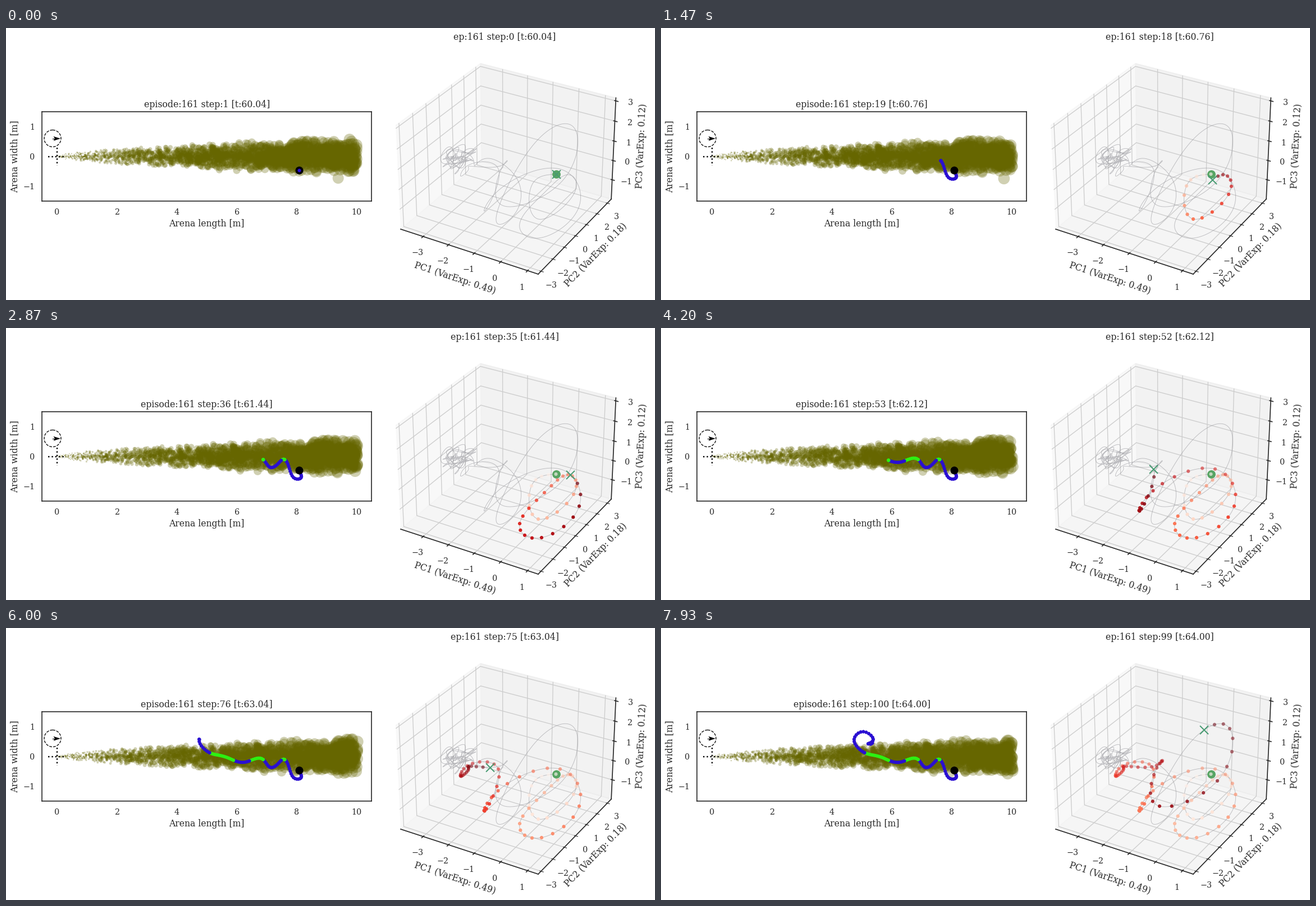
Recreate the animation shown at these times as a matplotlib script. Size 1156x484 px, loop 8000 ms.

```python
import numpy as np
import matplotlib.pyplot as plt
from matplotlib.animation import FuncAnimation
from matplotlib.patches import Circle, Polygon

W, H, DPI = 1156, 484, 100
STEPS, LOOP_MS = 100, 8000
PT = 72 / DPI
DARK = "0.15"

plt.rcParams.update({
    "font.family": "DejaVu Serif",
    "axes.titlesize": 15.75 * PT, "axes.labelsize": 15.65 * PT,
    "xtick.labelsize": 14.3 * PT, "ytick.labelsize": 14.3 * PT,
    "axes.edgecolor": DARK, "axes.labelcolor": DARK, "text.color": DARK,
    "xtick.color": DARK, "ytick.color": DARK,
    "axes.linewidth": 1.65 * PT, "xtick.major.width": 1.65 * PT,
    "grid.color": "0.8", "grid.linewidth": 1.3 * PT,
})

rng = np.random.default_rng(161)


def spline(knots, sub):
    """Natural cubic spline with `sub` samples per knot interval."""
    k = np.asarray(knots, float)
    n = len(k)
    system = 4 * np.eye(n) + np.eye(n, k=1) + np.eye(n, k=-1)
    system[0, :2], system[-1, -2:] = (1, 0), (0, 1)
    rhs = np.zeros_like(k)
    rhs[1:-1] = 6 * (k[:-2] - 2 * k[1:-1] + k[2:])
    bend = np.linalg.solve(system, rhs)
    u = np.arange((n - 1) * sub + 1) / sub
    i = np.minimum(u.astype(int), n - 2)
    t = (u - i)[:, None]
    s = 1 - t
    return s * k[i] + t * k[i + 1] + ((s**3 - s) * bend[i] + (t**3 - t) * bend[i + 1]) / 6


def box(left, top, width, height):
    return [left / W, (H - top - height) / H, width / W, height / H]


def dot_size(radius):
    return (2 * radius * PT) ** 2


# Flight track in the arena, one key point per five steps
track = spline([
    (521.5, 253), (525.5, 266.5), (512, 266), (503.5, 246), (494.5, 233.5),
    (483, 243), (469.5, 247.5), (458, 234), (443, 233), (427, 238.5),
    (411, 237.5), (396.5, 231.5), (382, 227), (368, 224), (354, 216),
    (344, 198), (360.5, 184.5), (378, 198), (369, 206), (376, 204.5), (371, 207)], 5)
in_odor = np.abs(track[:, 1] - 229) < 6.5
track_color = np.where(in_odor, "#2df012", "#2a0fd2")

# Projected state path, one key point per four steps, ending in a random tangle
state_keys = [
    (979.5, 260), (936, 281), (948, 340), (1011, 296), (1001, 261), (959, 293),
    (915, 348), (954, 373), (1021, 317), (987, 251), (893, 277), (853, 320),
    (861, 313), (877, 251), (831, 241), (810, 260), (814, 262), (824, 251),
    (829, 246), (874, 247), (893, 236), (878, 261), (888, 317), (991, 272),
    (1013, 179), (948, 198), (885, 300), (877, 349), (910, 325), (910, 268), (860, 232)]
tangle = np.clip(rng.normal((804, 229), (16, 13), (46, 2)), (778, 198), (835, 260))
state_line = spline(np.vstack([state_keys, tangle]), 16)
state = state_line[::4][:STEPS]
shade = np.interp(state[:, 1], [240, 335], [0.55, 1])

# Odor puffs drift downwind while spreading; a few strays lie further out
WIND = 0.5
puff_x = rng.uniform(-2, 10, 2300)
puff_n = rng.triangular(-1, 0, 1, puff_x.size)
puff_n[:30] *= 1.5

fig = plt.figure(figsize=(W / DPI, H / DPI), dpi=DPI, facecolor="white")

arena = fig.add_axes(box(64.3, 149.2, 587, 159))
arena.set(xlim=(-0.5, 10.5), ylim=(-1.5, 1.5), xticks=range(0, 11, 2), yticks=(-1, 0, 1))
arena.tick_params(length=0, pad=9.5)
arena.set_xlabel("Arena length [m]", labelpad=3)
arena.set_ylabel("Arena width [m]")
arena_title = arena.set_title("", y=1)

space = fig.add_axes(box(670, 29.3, 436.2, 436.2), projection="3d", facecolor="none")
space.view_init(elev=30, azim=-60)
space.set(xlim=(-3.905, 1.39), ylim=(-3.236, 3.394), zlim=(-2.02, 3.15),
          xticks=range(-3, 2), yticks=range(-3, 4), zticks=range(-1, 4))
space.set_xlabel("PC1 (VarExp: 0.49)", labelpad=4)
space.set_ylabel("PC2 (VarExp: 0.18)", labelpad=2)
space.set_zlabel("PC3 (VarExp: 0.12)", labelpad=1)
space_title = space.set_title("")
space_title.set_y(1)

# Pixel-space layer for everything that sits on the two plots
top = fig.add_axes([0, 0, 1, 1], facecolor="none", zorder=5)
top.set(xlim=(0, W), ylim=(H, 0))
top.axis("off")

puffs = top.scatter([], [], color="#666600", alpha=0.3, linewidths=0, zorder=1)
for x, y in [((75, 107), (229, 229)), ((91.3, 91.3), (213, 245))]:
    top.plot(x, y, ":", color="black", lw=2.4 * PT, zorder=2)
top.add_patch(Circle((83, 196.5), 15, fill=False, ls="--", lw=1.3 * PT, ec="black"))
top.plot([83, 89], [196.8, 196.8], color="black", lw=1.2 * PT)
top.add_patch(Polygon([(97, 196.8), (84.5, 192.8), (87, 196.8), (84.5, 200.8)], color="black", lw=0))

trail = top.scatter([], [], s=dot_size(3.1), linewidths=0, zorder=3)
top.scatter(*track[0], s=dot_size(7), color="black", linewidths=0, zorder=4)
head = top.scatter([], [], s=dot_size(3.1), linewidths=0, zorder=5)

top.plot(*state_line.T, color="#8c8c92", alpha=0.55, lw=0.9 * PT, zorder=2)
top.scatter(*state[0], s=dot_size(7.4), color="#57a463", linewidths=0, zorder=3)
dots = top.scatter([], [], s=dot_size(3.1), linewidths=0, zorder=4)
cross, = top.plot([], [], "x", color="#479b72", ms=15 * PT, mew=2 * PT, zorder=5)


def draw(step):
    seconds = 0.04 * step
    clock = f"[t:{60.04 + seconds:.2f}]"
    arena_title.set_text(f"episode:161 step:{step + 1} {clock}")
    space_title.set_text(f"ep:161 step:{step} {clock}")

    x = puff_x + WIND * seconds
    live = (x > 0.02) & (x < 10.03)
    x = x[live]
    y = 0.19 * np.sqrt(x) * puff_n[live]
    puffs.set_offsets(np.column_stack([91 + 53.36 * x, 228.7 - 53 * y]))
    puffs.set_sizes(dot_size(0.6 + x))

    trail.set_offsets(track[:step + 1])
    trail.set_facecolor(track_color[:step + 1].tolist())
    head.set_offsets(track[step:step + 1])
    head.set_facecolor(str(track_color[step]))

    colors = plt.cm.Reds(np.arange(step) / max(step, 1))
    colors[:, 3] = shade[:step]
    dots.set_offsets(state[:step])
    dots.set_facecolor(colors)
    cross.set_data(state[step:step + 1].T)
    return puffs, trail, head, dots, cross, arena_title, space_title


anim = FuncAnimation(fig, draw, frames=STEPS, interval=LOOP_MS / STEPS,
                     repeat=True, repeat_delay=0, blit=False)
plt.show()
```
